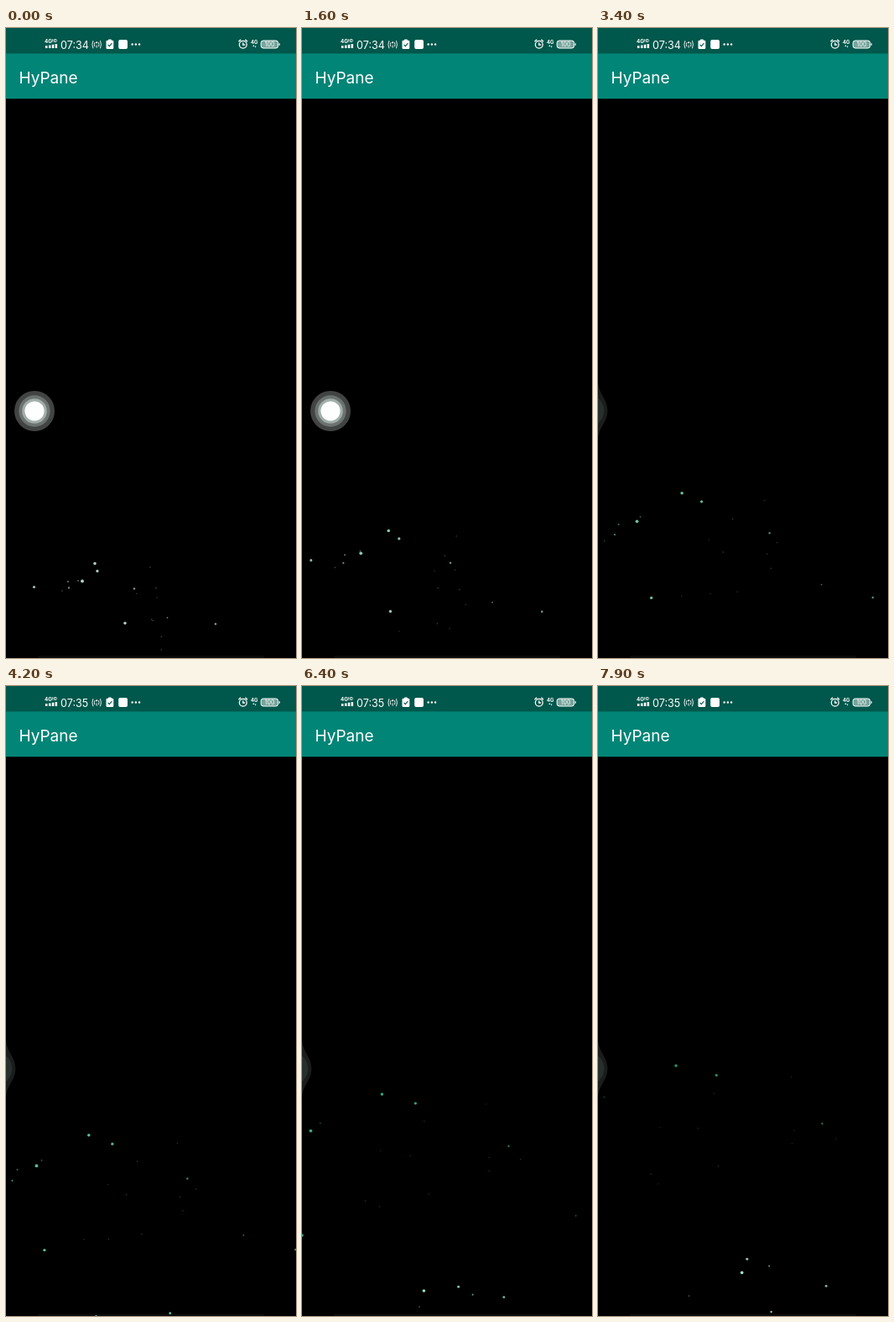
An HTML page that plays this animation: 346 by 750 pixels, repeating every 8 s.

```html
<!DOCTYPE html>
<html lang="en">
<head>
<meta charset="utf-8">
<title>Drifting sparks</title>
<style>
  html, body { margin: 0; width: 100%; height: 100%; overflow: hidden; background: #000; }
  svg { display: block; width: 100vw; height: 100vh; }
  text { font-family: Inter, Roboto, sans-serif; fill: #fff; }
</style>
</head>
<body>
<svg viewBox="0 0 346 750" preserveAspectRatio="none">
  <rect width="346" height="750"/>
  <rect x="38" y="747.5" width="270" height="2.5" fill="#0c0c0c"/>
  <g id="sparks"></g>

  <g id="button">
    <circle cx="34" cy="456" r="24" fill="#424443"/>
    <circle cx="34" cy="456" r="18.7" fill="#6c7371"/>
    <circle cx="34" cy="456" r="14.8" fill="#a2aeaa"/>
    <circle cx="34" cy="456" r="11.6" fill="#fcfffe"/>
  </g>
  <g id="tab">
    <path id="tabOuter" d="M0 421C1 437 11.3 441 11.3 455.5S1 474 0 490Z"/>
    <path id="tabInner" d="M0 440C4 444 7.2 449 7.2 455.5S4 467 0 471Z"/>
  </g>

  <rect width="346" height="31" fill="#00574b"/>
  <rect y="30.4" width="346" height="53.8" fill="#008577"/>
  <text x="15.5" y="66" font-size="19">HyPane</text>

  <g fill="#fff">
    <g font-weight="700">
      <text x="46" y="18" font-size="6.2">4G</text>
      <text x="54.5" y="16.5" font-size="4.3">HD</text>
      <text x="292" y="18.5" font-size="6">4G</text>
    </g>
    <path d="M47 21h2.500v3H47zM51 20.500h2.500V24H51zM54.800 19.800h2.500V24h-2.500zM58.600 19h2.500v5h-2.500z"/>
    <text id="clock" x="65" y="24.7" font-size="12.6">07:34</text>
    <path d="M103.800 15.500q-2 4.200 0 8.400M112.600 15.500q2 4.200 0 8.400M105.800 17.500q-1 2.200 0 4.400M110.600 17.500q1 2.200 0 4.400M108.200 20.800v2.500"
          fill="none" stroke="#fff" stroke-width=".9" stroke-linecap="round"/>
    <circle cx="108.2" cy="17.3" r="1.1"/>
    <rect x="119.500" y="14.800" width="8.800" height="10.200" rx="1.3"/>
    <rect x="122" y="13.500" width="3.800" height="2.500" rx=".8"/>
    <path d="M121.600 19.800l1.800 1.800 3-3.400" fill="none" stroke="#00574b" stroke-width="1.1"/>
    <rect x="134.200" y="14" width="10.800" height="11" rx="2"/>
    <circle cx="150.700" cy="19.500" r="1.2"/>
    <circle cx="154.900" cy="19.500" r="1.2"/>
    <circle cx="159.100" cy="19.500" r="1.2"/>
    <g fill="none" stroke="#fff" stroke-width="1.3">
      <circle cx="282.800" cy="19.700" r="4.4"/>
      <path d="M277.500 16.200l2.700-2.500M288.100 16.200l-2.700-2.500M282.800 17.200v2.800h2.300"/>
    </g>
    <path d="M294.300 22l1-2 1 2zM296.600 21.500h2l-1 2z"/>
    <rect x="304.200" y="15" width="20.500" height="9" rx="2.800" fill="#78a49c" stroke="#fff"/>
    <path d="M325.700 17.800q1.200 0 1.200 1.700t-1.200 1.700z"/>
    <text x="314.500" y="22.200" font-size="7" text-anchor="middle">100</text>
  </g>
</svg>

<script>
const LOOP = 8000, STEP = 100, TRAVEL = 186, FLOOR = 750, FAINT = 10;
const $ = id => document.getElementById(id);
const mix = (a, b, u) => a + (b - a) * u;
const clamp = u => Math.min(1, Math.max(0, u));
const hsl = (h, s, l) => `hsl(${h} ${s}% ${l}%)`;

let seed = 7;
const random = () => (seed = seed * 16807 % 2147483647) / 2147483647;

// Main sparks, largest first: start x, start y, heading in degrees from straight up
const launches = [
  [91, 658.5, -32], [28, 816.5, 50.6], [106, 637.5, -4], [142, 708.5, -69],
  [109, 646.5, 10], [33.5, 665.5, -35.5], [226, 862, -15], [101, 787, 67],
  [168, 927, 12], [250, 709.5, 68], [153, 667.5, 38], [75, 666.5, -41],
  [201, 876.5, 1], [74, 659, -36], [192.5, 702, 62], [86, 658, -25],
  [280.5, 797, -67.6], [67, 670, -45]
];

function makeSpark(x, y, heading, r) {
  const node = document.createElementNS("http://www.w3.org/2000/svg", "circle");
  node.setAttribute("r", r);
  node.setAttribute("opacity", clamp(r / 1.7));
  $("sparks").append(node);
  const angle = heading * Math.PI / 180;
  const fresh = y > FLOOR;
  return (u, distance) => {
    node.setAttribute("cx", x + distance * Math.sin(angle));
    node.setAttribute("cy", y - distance * Math.cos(angle));
    // Early sparks fade to deep green, those from below the floor turn pale
    node.setAttribute("fill", fresh
      ? hsl(160, mix(75, 50, u), mix(60, 76, u))
      : hsl(160, mix(28, 54, u), mix(75, 36, u)));
  };
}

const sparks = launches.map((launch, i) =>
  makeSpark(...launch, mix(1.9, .75, i / (launches.length - 1))));
for (let i = 0; i < FAINT; i++) {
  sparks.push(makeSpark(mix(130, 190, random()), mix(635, 765, random()),
    mix(-50, 50, random()), mix(.55, .8, random())));
}

function draw(t) {
  const u = t / (LOOP - STEP);
  const distance = TRAVEL * (u + .022 * Math.sin(Math.PI * u) ** 2);
  sparks.forEach(move => move(u, distance));

  // The round button slides into the left edge and leaves a dimming tab
  const p = clamp((t - 1800) / 500);
  const docked = p === 1;
  $("button").setAttribute("transform", `translate(${-50 * p * p * (3 - 2 * p)} 0)`);
  $("button").setAttribute("visibility", docked ? "hidden" : "visible");
  $("tab").setAttribute("visibility", docked ? "visible" : "hidden");
  const dim = clamp((t - 2500) / 500);
  $("tabOuter").setAttribute("fill", hsl(160, 5, mix(28, 11, dim)));
  $("tabInner").setAttribute("fill", hsl(160, 11, mix(45, 17, dim)));

  $("clock").textContent = t < LOOP / 2 ? "07:34" : "07:35";
}

const start = performance.now();
function tick() {
  const t = (performance.now() - start) % LOOP;
  draw(Math.floor(t / STEP) * STEP);
  requestAnimationFrame(tick);
}
tick();
</script>
</body>
</html>
```
